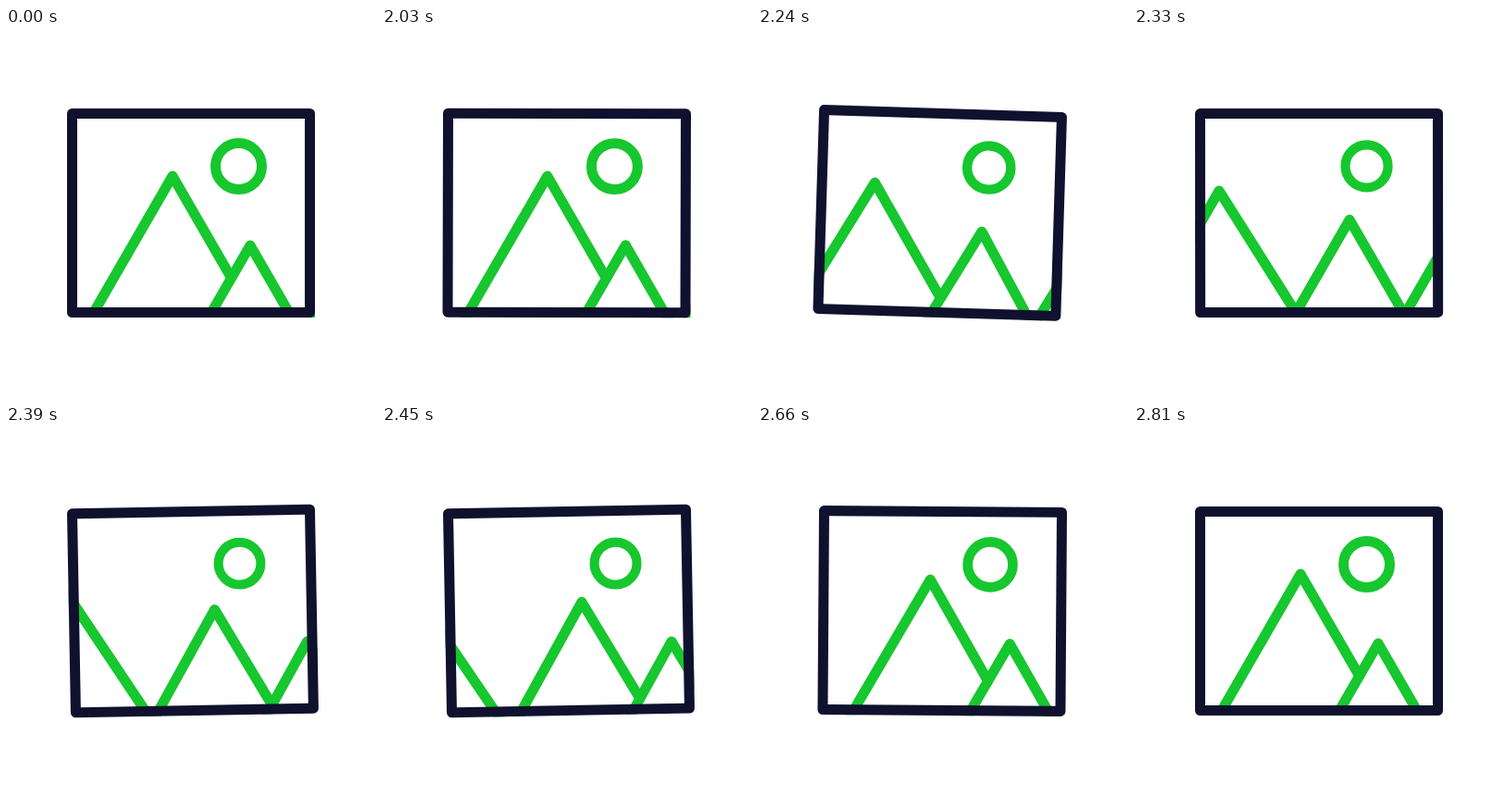
Animation, 400 px wide and 400 px high, one loop 2900 ms. Source, as an HTML page with a canvas:

```html
<!DOCTYPE html>
<html lang="en">
<head>
<meta charset="utf-8">
<title>Picture icon</title>
<style>
  html, body { margin: 0; width: 100%; height: 100%; overflow: hidden; background: #fff; }
  canvas { display: block; width: 400px; height: 400px; }
</style>
</head>
<body>
<canvas id="stage" width="400" height="400"></canvas>
<script>
const ctx = document.getElementById('stage').getContext('2d');
const LOOP = 2900, START = 2000, STEP = 30;
const INK = '#10112e', GREEN = '#16c72e';
const SLOPE = Math.sqrt(3);

// [time, degrees] of the damped swing
const SWING = [[2000, 0], [2195, 2.1], [2420, -1.2], [2590, 0.55], [2800, 0]];
// [time, scale] of the sun
const SUN = [[2000, 1], [2400, 0.915], [2800, 1]];
// [time, progress] of the mountains sliding left
const SLIDE = [[2000, 0], [2800, 1]];

const mix = (a, b, p) => a + (b - a) * p;
const mixPoint = (a, b, p) => [mix(a[0], b[0], p), mix(a[1], b[1], p)];
const ease = u => u * u * (3 - 2 * u);

function valueAt(keys, t) {
  if (t <= keys[0][0]) return keys[0][1];
  for (let i = 1; i < keys.length; i++) {
    const [t0, v0] = keys[i - 1], [t1, v1] = keys[i];
    if (t < t1) return mix(v0, v1, ease((t - t0) / (t1 - t0)));
  }
  return keys[keys.length - 1][1];
}

function line(points) {
  ctx.beginPath();
  points.forEach(p => ctx.lineTo(p[0], p[1]));
  ctx.stroke();
}

// Foot of a 60 degree slope; side is -1 (left) or 1 (right)
const foot = ([x, y], side) => [x + side * (330 - y) / SLOPE, 330];

// Where the right slope of a meets the left slope of b
function valley(a, b) {
  const x = (a[0] + b[0]) / 2 + (b[1] - a[1]) / (2 * SLOPE);
  return [x, a[1] + (x - a[0]) * SLOPE];
}

function drawMountains(p) {
  const first = mixPoint([180, 160], [-58, 203], p);
  const second = mixPoint([264, 235], [180, 160], p);
  const third = mixPoint([378, 235], [264, 235], p);
  const firstEnd = mixPoint([243.5, 270], [57, 370], p);

  line([foot(first, -1), first, firstEnd]);
  line([foot(second, -1), second, valley(second, third)]);
  line([foot(third, -1), third, foot(third, 1)]);
}

function drawSun(scale) {
  ctx.save();
  ctx.translate(251.5, 149.5);
  ctx.scale(scale, scale);
  ctx.beginPath();
  ctx.arc(0, 0, 25, 0, Math.PI * 2);
  ctx.stroke();
  ctx.restore();
}

function draw(t) {
  ctx.fillStyle = '#fff';
  ctx.fillRect(0, 0, 400, 400);
  ctx.lineWidth = 11;
  ctx.lineCap = ctx.lineJoin = 'round';

  ctx.save();
  ctx.translate(200, 92.5);
  ctx.rotate(valueAt(SWING, t) * Math.PI / 180);
  ctx.translate(-200, -92.5);

  ctx.strokeStyle = GREEN;
  drawSun(valueAt(SUN, t));

  ctx.save();
  ctx.beginPath();
  ctx.rect(66, 87, 268, 226);
  ctx.clip();
  drawMountains(valueAt(SLIDE, t));
  ctx.restore();

  ctx.strokeStyle = INK;
  ctx.strokeRect(71.5, 92.5, 257, 215);
  ctx.restore();
}

function tick() {
  const t = performance.now() % LOOP;
  draw(START + Math.floor((t - START) / STEP) * STEP);
  requestAnimationFrame(tick);
}
tick();
</script>
</body>
</html>
```
